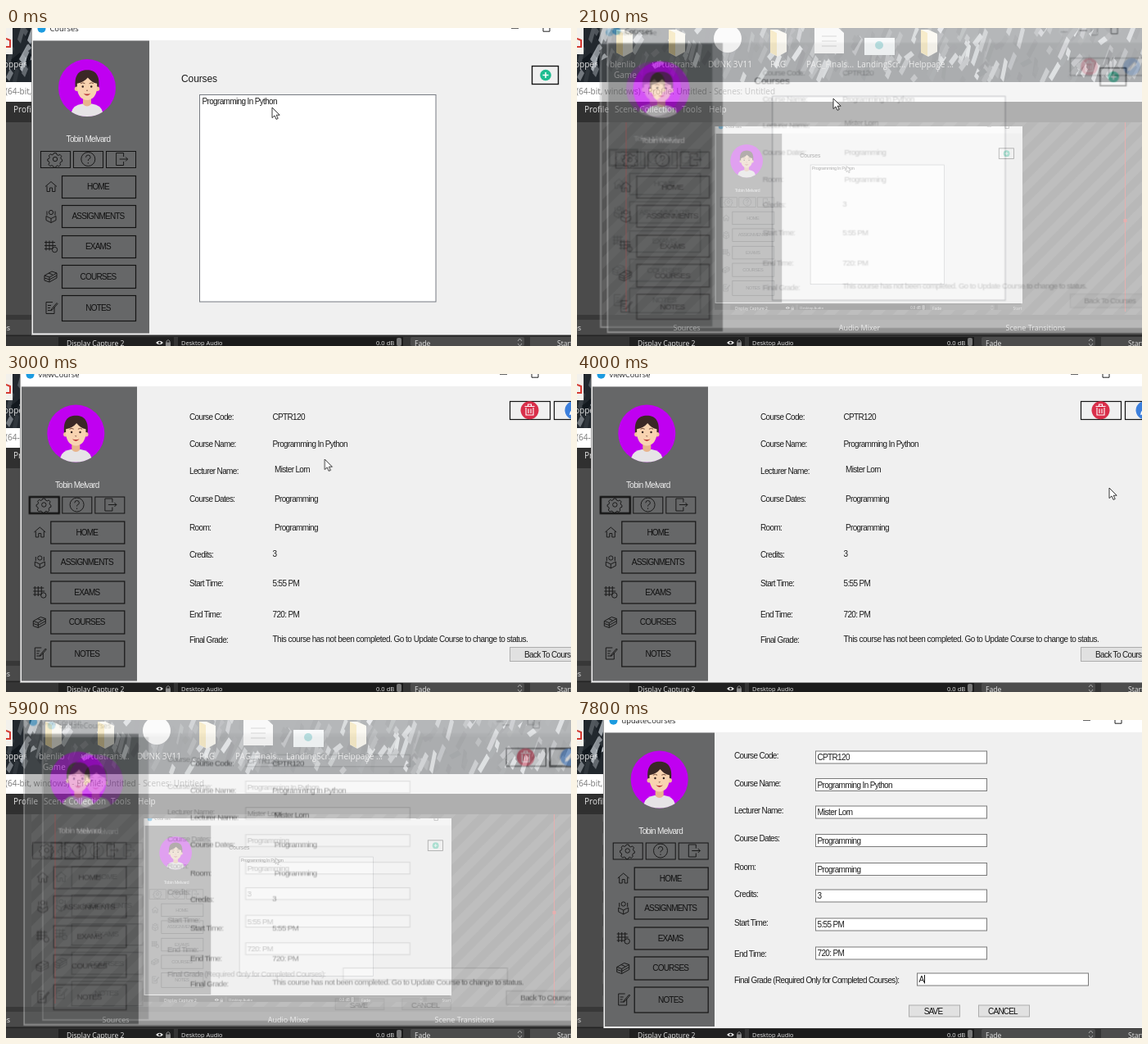
An HTML page for the animation above (8 s loop, 690 by 388 pixels).

```html
<!DOCTYPE html>
<html lang="en">
<head>
<meta charset="utf-8">
<title>Course planner</title>
<style>
html, body { margin: 0; width: 100%; height: 100%; overflow: hidden; background: #333; }
svg { display: block; width: 100vw; height: 100vh; }
text { font: 10px "Liberation Sans", Arial, sans-serif; letter-spacing: -.65px; fill: #1c1c1c; white-space: pre; }
.menu { letter-spacing: -.8px; fill: #111; }
.ui { font-family: "Open Sans", "Noto Sans", sans-serif; letter-spacing: 0; fill: #e4e4e4; }
.mid { text-anchor: middle; }
.line { fill: none; stroke: #1a1a1a; stroke-width: 1; }
.bar { color: #222; }
.bar text { fill: currentColor; font-size: 9.3px; }

/* Every animation shares the 8 s loop; 1.25% is 100 ms. */
.anim { animation: 8s step-end infinite; }
#courses { animation-name: courses; transform-origin: 380px 207px; }
#view { animation-name: view; transform-origin: 290px 115px; }
#update { animation-name: update; transform-origin: 320px 150px; }
#view .bar { animation-name: dim; }
#view .was { animation-name: beforeEdit; }
#view .now { animation-name: afterEdit; }
#update .was { animation-name: beforeGrade; }
.row { animation-name: row; }
.caret { animation-name: caret; }
.typed { animation-name: typed; }
.beam { animation-name: beam; }
.pointer { animation-name: pointer; }

@keyframes courses {
  0% { opacity: 1; transform: none; }
  26.25% { opacity: .45; transform: scale(.986); }
  27.5% { opacity: .1; transform: scale(.97); }
  28.75%, 100% { opacity: 0; transform: scale(.96); }
}
@keyframes view {
  0% { opacity: 0; transform: scale(.95); }
  26.25% { opacity: .4; transform: scale(.96); }
  27.5% { opacity: .75; transform: scale(.986); }
  28.75% { opacity: .95; transform: scale(.997); }
  30% { opacity: 1; transform: none; }
  73.75% { opacity: .45; transform: scale(.986); }
  75% { opacity: .1; transform: scale(.97); }
  76.25%, 100% { opacity: 0; transform: scale(.96); }
}
@keyframes update {
  0% { opacity: 0; transform: scale(.95); }
  73.75% { opacity: .4; transform: scale(.96); }
  75% { opacity: .8; transform: scale(.988); }
  76.25%, 100% { opacity: 1; transform: none; }
}
@keyframes dim { 0% { color: #222; } 58.75%, 100% { color: #a0a0a0; } }
@keyframes beforeEdit { 0% { opacity: 1; } 58.75%, 100% { opacity: 0; } }
@keyframes afterEdit { 0% { opacity: 0; } 58.75%, 100% { opacity: 1; } }
@keyframes beforeGrade { 0% { opacity: 1; } 87.5%, 100% { opacity: 0; } }
@keyframes row { 0% { opacity: 1; } 12.5%, 100% { opacity: 0; } }
@keyframes caret {
  0% { opacity: 0; transform: none; }
  87.5% { opacity: 1; transform: none; }
  93.75%, 100% { opacity: 1; transform: translateX(7px); }
}
@keyframes typed { 0% { opacity: 0; } 93.75%, 100% { opacity: 1; } }
@keyframes beam { 0% { opacity: 0; } 87.5% { opacity: 1; } 93.75%, 100% { opacity: 0; } }
@keyframes pointer {
  0% { transform: translate(325px, 97px); opacity: 1; }
  1.25% { transform: translate(325px, 97px); animation-timing-function: steps(7); }
  10% { transform: translate(313px, 86px); }
  35% { transform: translate(313px, 86px); animation-timing-function: steps(8); }
  45% { transform: translate(618px, 158px); animation-timing-function: steps(4); }
  50% { transform: translate(650px, 139px); animation-timing-function: steps(5); }
  56.25% { transform: translate(692px, 46px); }
  76.25% { transform: translate(688px, 51px); animation-timing-function: steps(4); }
  81.25% { transform: translate(610px, 180px); opacity: 1; animation-timing-function: steps(5); }
  87.49% { transform: translate(490px, 312px); opacity: 1; }
  87.5%, 100% { transform: translate(490px, 312px); opacity: 0; }
}
</style>
</head>
<body>
<svg id="stage" viewBox="0 0 690 388" preserveAspectRatio="none"></svg>
<script>
const rect = (x, y, w, h, fill, more = '') =>
  `<rect x="${x}" y="${y}" width="${w}" height="${h}" fill="${fill}" ${more}/>`;
const text = (x, y, s, cls = '', more = '') => `<text x="${x}" y="${y}" class="${cls}" ${more}>${s}</text>`;
const disc = (x, y, r, fill) => `<circle cx="${x}" cy="${y}" r="${r}" fill="${fill}"/>`;
const line = (d, more = '') => `<path class="line" d="${d}" ${more}/>`;
const frame = (x, y, w, h, width = 1, cls = '') =>
  rect(x + .5, y + .5, w, h, 'none', `stroke="#141414" stroke-width="${width}" class="${cls}"`);
const at = (x, y, body) => `<g transform="translate(${x} ${y})">${body}</g>`;

let seed = 7;
const random = () => (seed = seed * 16807 % 2147483647) / 2147483647;

const avatar = `
  ${disc(0, 0, 35, '#c000f1')}
  <path d="M-19 29.5Q-17 21 -6 19.500H6Q17 21 19 29.5A35 35 0 0 1-19 29.5Z" fill="#e6e4e6"/>
  <path d="M-5 12H5V20Q0 25-5 20Z" fill="#e8b48c"/>
  <g transform="translate(0 -2.500) scale(.87 .92)">
    <path d="M-16 5C-19-14-12-21 0-21S19-14 16 5Z" fill="#3b2826"/>
    ${disc(-14.5, 4, 3, '#f1c39c')}${disc(14.5, 4, 3, '#f1c39c')}
    <path d="M-14-3Q-4-5 1-11Q7-4 14-3V4Q12 18 0 19Q-12 18-14 4Z" fill="#f8d3b0"/>
    ${disc(-6, 1, 1.4, '#33211f')}${disc(6, 1, 1.4, '#33211f')}
    <path d="M-9-3q3-2 6 0M3-3q3-2 6 0M-1 6q1 1 2 0" fill="none" stroke="#6b4030"/>
    <path d="M-5 10Q0 12 5 10Q0 16-5 10Z" fill="#b93b3b"/>
  </g>`;

const icons = {
  gear: line('M-1.4-7.5h2.8l.6 2 2 .9 2-1 1.8 2-1 1.9.6 1.7 1.2.6v2.2l-1.8.6-.9 1.8.7 1.8-2 1.8-2-1-1.3.8-.6 1.6h-2.4l-.7-1.8-1.8-.8-2 .9-1.8-2 1-2-.7-1.7-1.5-.6v-2.2l1.7-.6.8-1.8-1-1.8 2-1.9 1.8 1 1.7-.8Z')
    + '<circle class="line" r="2.7"/>',
  help: '<circle class="line" r="8.5"/>' + line('M-2.8-2.2Q-2.6-5 0-5T2.8-2.3Q2.8-.5 1-.2 0 .5 0 2M0 4v1.5', 'stroke-width="1.4"'),
  exit: line('M3-3v-4.5h-9v15h9V3M-2 0H8M5.5-2.5L8 0 5.5 2.5'),
  home: line('M-7 0L0-6 7 0M-5-1V6H-1.5V1.5h3V6H5V-1'),
  reader: '<circle class="line" cy="-4.5" r="2.6"/>' + line('M-6 0L0 3 6 0V5L0 8-6 5ZM0 3V8M-5-6v5M5-6v5'),
  exam: line('M-8-5H5M-8-1H6M-8 3H2M-6-7V5M-2-7V5M2-7V3') + '<circle class="line" cx="4.5" cy="4" r="3.2"/>',
  books: line('M-8-1L1-6 7-4-2 1ZM-8-1v3l6 2 9-5M-8 2v3l6 2 9-5M-2 1v6M7-4V2M-3-4l5 2'),
  notes: line('M4-1V7H-6V-7H2M-4-3H0M-4 0H-1M-4 3H1M7-6L1 1 0 3 2 2 8-5Z'),
};

const menu = [['HOME', 'home', 180, 27], ['ASSIGNMENTS', 'reader', 216, 27], ['EXAMS', 'exam', 253, 27],
  ['COURSES', 'books', 289, 28], ['NOTES', 'notes', 326, 31]];

const sidebar = (dx, dy, focus) => at(dx, dy,
  at(99, 73, avatar) + text(100.5, 139, 'Tobin Melvard', 'mid', 'style="fill:#eee"')
  + ['gear', 'help', 'exit'].map((name, i) =>
      frame(42 + 40 * i, 150, 36, 20) + at(60 + 40.3 * i, 160, icons[name])).join('')
  + (focus ? frame(42, 150, 36, 20, 2.2, 'anim was') : '')
  + menu.map(([label, icon, y, h]) => frame(68, y, 90, h, 1.2)
      + text(112.5, y + h / 2 + 3.5, label, 'mid menu') + at(55, y + h / 2, icons[icon])).join(''));

const shell = (x, sideWidth, bottom, title, dx, dy, focus) =>
  rect(x, -30, 730, bottom + 30, '#f0f0f0') + rect(x, -30, 730, 45, '#fff')
  + `<path d="M${x + .5}-30V${bottom}" stroke="#8a8a8a" stroke-width=".8"/>`
  + rect(x + 2, 15.5, sideWidth, bottom - 17.5, '#666768')
  + `<g class="anim bar">${disc(x + 12.5, .8, 5, '#1c9be0')}${text(x + 22.5, 4.2, title, 'ui')}
     <path d="M${x + 586} .2h9M${x + 625}-4v8.2h8v-8.2" fill="none" stroke="currentColor"/></g>`
  + sidebar(dx, dy, focus);

const labels = ['Course Code:', 'Course Name:', 'Lecturer Name:', 'Course Dates:', 'Room:', 'Credits:', 'Start Time:', 'End Time:'];
const values = ['CPTR120', 'Programming In Python', 'Mister Lorn', 'Programming', 'Programming', '3', '5:55 PM', '720: PM'];

const courses = shell(31, 142, 374.5, 'Courses', 0, 0, false)
  + text(214, 66, 'Courses', '', 'style="font-size:12px;letter-spacing:-.1px"')
  + rect(236.5, 81.5, 288.5, 252.5, '#fff', 'stroke="#777b82"')
  + text(239.5, 92.5, values[1], 'anim row')
  + frame(642, 46, 32, 22, 1.4) + disc(659, 57.5, 6.8, '#1fbd91')
  + '<path d="M655.5 57.5h7M659 54v7" stroke="#fff" stroke-width="1.5"/>';

const viewRows = [55.5, 88.5, 122, 156, 191, 223.5, 259, 297];
const view = shell(17, 141, 376.5, 'viewCourse', -13.7, -.5, true)
  + viewRows.map((y, i) => text(224, y, labels[i])
      + text(i > 1 && i < 5 ? 328 : 325.5, i == 2 ? 119.5 : i == 5 ? 222.5 : y, values[i])).join('')
  + text(224, 328, 'Final Grade:')
  + text(325.5, 326.5, 'This course has not been completed. Go to Update Course to change to status.', '', 'style="letter-spacing:-.52px"')
  + rect(615.5, 333.5, 98, 17, '#e1e1e1', 'stroke="#adadad"') + text(633, 345.5, 'Back To Courses')
  + frame(615, 33, 49, 22, 1.2) + disc(639.5, 44.3, 11, '#d92f4a')
  + '<path d="M635 41v9h9v-9M633.5 39.5h12M637.5 39v-2h4v2M638 42.5v5.500M641 42.5v5.500" fill="none" stroke="#fff" stroke-width="1.1"/>'
  + frame(669, 33, 49, 22, 1.2) + frame(669, 33, 49, 22, 2.2, 'anim now') + disc(693.5, 44.3, 11, '#3c7fdc')
  + '<path d="M688 50l1-4 8-8 3 3-8 8Z" fill="#fff"/>';

const field = (x, y) => rect(x + .5, y + .5, 209, 15, '#fff', 'stroke="#7a7a7a"');
const button = (x, label) => rect(x + .5, 348, 62, 14, '#e1e1e1', 'stroke="#adadad"') + text(x + 30, 359, label, 'mid menu');
const labelRows = [47, 81, 114, 148, 183, 215.5, 251, 289];
const fieldRows = [37.5, 71, 104.5, 139, 174, 206.5, 241.5, 276.5];
const update = shell(32, 134, 376, 'updateCourses', 1.7, -.5, true)
  + labelRows.map((y, i) => text(192, y, labels[i]) + field(291, fieldRows[i])
      + text(293.5, fieldRows[i] + 11.5, values[i])).join('')
  + text(192, 320.5, 'Final Grade (Required Only for Completed Courses):')
  + field(415, 308.5) + text(417.5, 320, 'A', 'anim typed')
  + '<path class="anim caret" d="M417.500 311v10.500" stroke="#111"/>'
  + button(405, 'SAVE') + button(490, 'CANCEL');

// Wallpaper: dark rock with random slanted light and dark shards.
const shards = Array.from({ length: 260 }, () => {
  const x = random() * 700, y = random() * 66, w = 3 + random() * 9, h = 6 + random() * 20;
  const shade = 15 + random() ** 2 * 190 | 0;
  return `<path d="M${x | 0} ${y | 0}l${w | 0}-${h | 0} 4 5-${w | 0} ${h | 0}Z" fill="rgb(${shade},${shade + 6},${shade + 12})"/>`;
}).join('');

const folder = x => `<path d="M${x} 2h9l11 5v22l-11 6-9-5Z" fill="#f4eedb"/><path d="M${x} 2l8 4v28l-8-4Z" fill="#e8c765"/>`;
const shortcuts = [[-3, 'opper'], [40, 'blenlib'], [92, 'virtuatrans...'], [160, 'DUNK 3V11'], [236, 'PAG'],
  [280, 'PAG_Finals...'], [342, 'LandingScr...'], [405, 'Helppage ...']];

const desktop = rect(0, 0, 690, 66, '#22282e') + shards
  + rect(-8, -4, 16, 36, '#f3f1ec') + '<path d="M0 13l5 2v8H0" fill="none" stroke="#d63b32" stroke-width="2"/>'
  + [48, 112, 236, 420].map(folder).join('')
  + disc(184, 13, 17, '#f2f2f2')
  + '<path d="M290-4h25l11 10v25h-36Z" fill="#eee"/><path d="M299 10h18M299 16h18M299 22h18" stroke="#888"/>'
  + rect(351, 12, 37, 21, '#e7eef0') + disc(369, 21, 5, '#35a9ae')
  + shortcuts.map(([x, s]) => text(x, 47.5, s, 'ui')).join('') + text(45, 61, 'Game', 'ui');

const footer = rect(0, 376, 690, 12, '#353535') + rect(0, 374.5, 690, 1.5, '#242424')
  + rect(64, 377, 141, 11, '#202020') + rect(210, 377, 275, 11, '#1b1b1b')
  + text(74, 387.5, 'Display Capture 2', 'ui', 'style="font-size:8.6px"')
  + '<path d="M183 384q4.500-4.500 9 0-4.500 4.500-9 0Z" fill="#eee"/>' + disc(187.5, 384, 1.5, '#222')
  + rect(195, 383.5, 6, 5, '#888') + '<path d="M196 384v-2q2-3 4 0v2" fill="none" stroke="#888"/>'
  + text(214, 387, 'Desktop Audio', 'ui', 'style="font-size:7.4px"')
  + text(452, 387, '0.0 dB', 'ui', 'style="font-size:7.6px"')
  + rect(477, 378, 6, 10, '#777', 'rx="2"')
  + rect(494, 377, 139, 11, '#4c4c4c', 'rx="2"') + text(499, 387.5, 'Fade', 'ui', 'style="font-size:8.6px"')
  + '<path d="M625 382l2.500-3 2.500 3M625 385l2.500 3 2.500-3" fill="none" stroke="#aaa"/>'
  + rect(640, 377, 50, 11, '#4c4c4c') + text(673, 387.5, 'Start', 'ui', 'style="font-size:8.6px"');

const arrow = '<path d="M0 0V12.600L3 9.900 5 14.400 7.200 13.400 5.200 9.200H9.200Z" fill="#fff" stroke="#222" stroke-width=".9"/>';

const recorder = rect(0, 66, 690, 24, '#fff')
  + text(-1, 81, '(64-bit, windows) - Profile: Untitled - Scenes: Untitled', 'ui', 'style="fill:#777"')
  + rect(0, 90, 690, 26, '#303030')
  + [[9, 'Profile'], [46, 'Scene Collection'], [128, 'Tools'], [161, 'Help']].map(([x, s]) => text(x, 102.5, s, 'ui')).join('')
  + rect(0, 115, 690, 236, '#4b4b4b') + rect(31, 115, 659, 236, 'url(#stripes)')
  + '<path d="M60 115V346M669.500 115V346" stroke="#d33030"/>' + rect(667.5, 233, 4, 4, '#d33030')
  + `<g clip-path="url(#monitor)"><g transform="translate(151 120) scale(.567 .577)">
     <use href="#coursesArt"/><use href="#footer"/>${at(314, 84, arrow)}</g></g>`
  + rect(0, 350, 690, 6, '#383838') + rect(0, 356, 690, 19, '#4a4a4a')
  + [[5, 'Scenes', 'end'], [134, 'Sources', 'middle'], [345, 'Audio Mixer', 'middle'], [560, 'Scene Transitions', 'middle']]
      .map(([x, s, anchor]) => text(x, 369, s, 'ui', `style="font-size:9px;text-anchor:${anchor}"`)).join('');

// The newer window opens beneath the one that is fading away.
document.getElementById('stage').innerHTML = `
  <defs>
    <pattern id="stripes" width="20" height="20" patternUnits="userSpaceOnUse" patternTransform="rotate(45)">
      ${rect(0, 0, 20, 20, '#484848')}${rect(0, 0, 10, 20, '#5a5a5a')}
    </pattern>
    <clipPath id="monitor">${rect(168, 120, 376, 227, '#000')}</clipPath>
  </defs>
  ${desktop}${recorder}<g id="footer">${footer}</g>
  <g id="update" class="anim">${update}</g>
  <g id="view" class="anim">${view}</g>
  <g id="courses" class="anim"><g id="coursesArt">${courses}</g></g>
  <path class="anim beam" d="M488 310h4M490 310v11M488 321h4" fill="none" stroke="#222"/>
  <g class="anim pointer">${arrow}</g>`;
</script>
</body>
</html>
```
